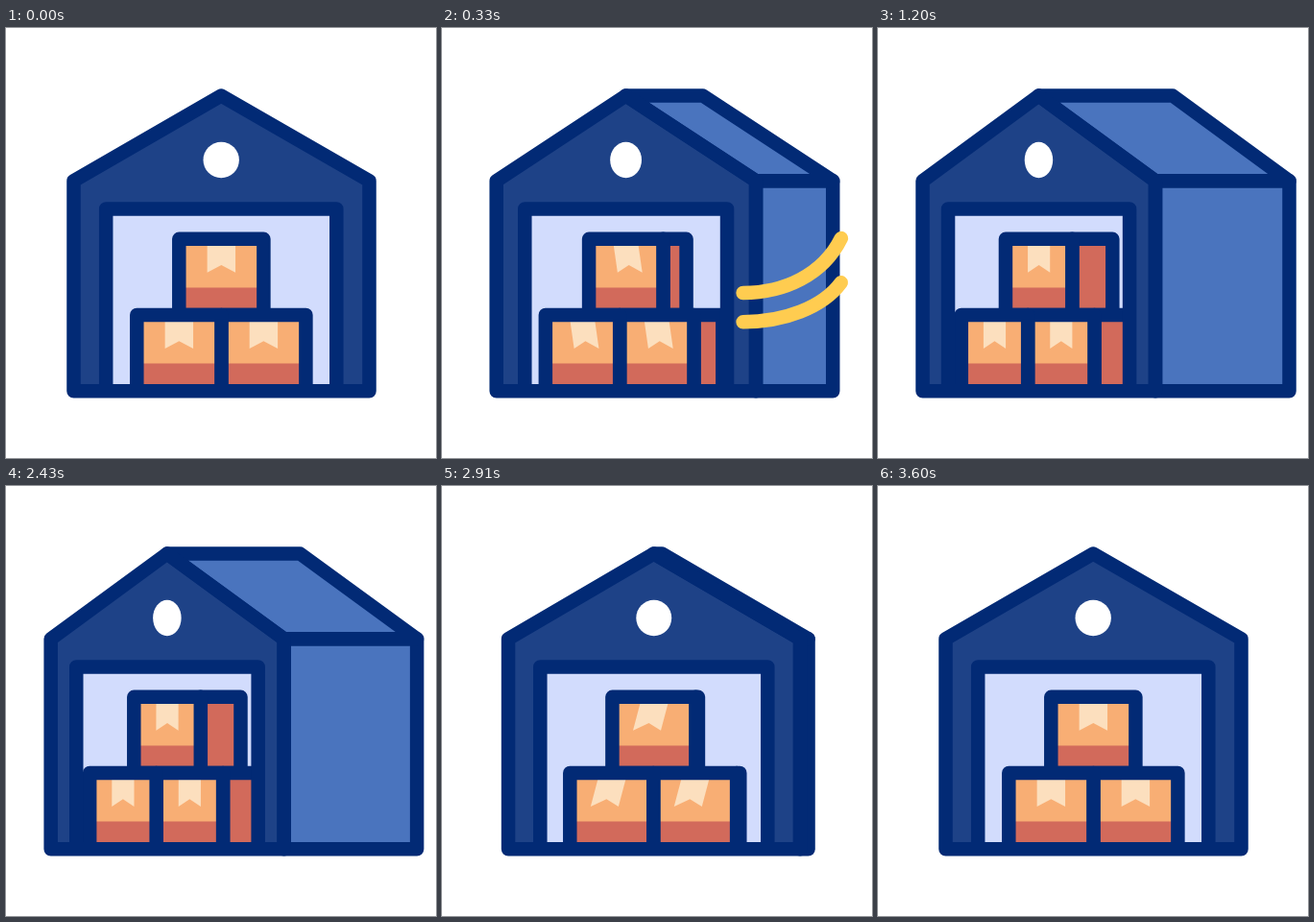
Write an HTML page with a canvas that moves like this. It is 448 by 448 pixels and loops after 4200 ms.

```html
<!DOCTYPE html>
<html lang="en">
<head>
<meta charset="utf-8">
<title>Warehouse</title>
<style>
  html, body { margin: 0; width: 100%; height: 100%; overflow: hidden; background: #fff; }
  canvas { display: block; width: 448px; height: 448px; }
</style>
</head>
<body>
<canvas id="stage" width="448" height="448"></canvas>
<script>
const ctx = document.getElementById('stage').getContext('2d');
const LOOP = 4200, STEP = 30;
const INK = '#022a75', FRONT = '#1e4287', SIDE = '#4a74be', INSIDE = '#d2dcfd';
const CARD = '#f8ae74', SHADE = '#d26a5b', TAPE = '#fcdfbe', STREAK = '#ffcc50';
const LINE = 14.5, APEX = 70.5, EAVE = 159.3, GROUND = 378.3, DOOR = 188.5;

// [time, value] tables: building turn and tape swing
const TURN = [[0, 0], [600, 1], [2400, 1], [3000, 0]];
const SWING = [[0, 0], [600, 8], [900, -8], [1200, 0], [2400, 0], [3000, -8], [3300, 8], [3600, 0]];

const mix = (a, b, k) => a + (b - a) * k;
const smooth = u => { u = Math.min(1, Math.max(0, u)); return u * u * (3 - 2 * u); };

function valueAt(table, t) {
  for (let i = 1; i < table.length; i++) {
    const [t0, a] = table[i - 1], [t1, b] = table[i];
    if (t <= t1) return mix(a, b, smooth((t - t0) / (t1 - t0)));
  }
  return table[table.length - 1][1];
}

function shape(points, fill, line) {
  ctx.beginPath();
  points.forEach(([x, y]) => ctx.lineTo(x, y));
  if (fill) {
    ctx.closePath();
    ctx.fillStyle = fill;
    ctx.fill();
  }
  if (line) {
    ctx.strokeStyle = line;
    ctx.lineWidth = LINE;
    ctx.stroke();
  }
}

const rect = (x0, y0, x1, y1, fill, line) =>
  shape([[x0, y0], [x1, y0], [x1, y1], [x0, y1]], fill, line);

function box(x0, x1, top, bottom, depth, swing, scale) {
  if (depth > 0) rect(x1, top, x1 + depth, bottom, SHADE, INK);
  const split = top + 50.6;
  rect(x0, top, x1, bottom, CARD);
  rect(x0, split, x1, bottom, SHADE);
  ctx.save();
  ctx.transform(scale, 0, swing * scale / 28, 1, (x0 + x1) / 2, top + 7);
  shape([[-14.7, 0], [14.7, 0], [14.7, 28], [0, 20.3], [-14.7, 28]], TAPE);
  ctx.restore();
  ctx.beginPath();
  ctx.rect(x0, top, x1 - x0, bottom - top);
  ctx.stroke();
}

// Drawn from the left tip; the streak enters from the right and leaves at the left
function streak(y, cy, endY, length, t) {
  const head = smooth(t / 300), tail = smooth((t - 300) / 300);
  if (head <= 0 || tail >= 1) return;
  ctx.save();
  ctx.beginPath();
  ctx.moveTo(313.6, y);
  ctx.bezierCurveTo(358, y, 400, cy, 418, endY);
  ctx.setLineDash([length * (head - tail), 2 * length]);
  ctx.lineDashOffset = -length * (1 - head);
  ctx.lineCap = 'round';
  ctx.lineWidth = LINE;
  ctx.strokeStyle = STREAK;
  ctx.stroke();
  ctx.restore();
}

function draw(t) {
  const turn = valueAt(TURN, t), swing = valueAt(SWING, t);
  const left = mix(70.5, 46.5, turn), right = mix(378.5, 289, turn);
  const depth = 139.5 * turn, scale = (right - left) / 308;
  const fx = x => left + (x - 70.5) * scale;
  const mid = fx(224.5) - 0.3, doorL = fx(104.2), doorR = fx(344.3);

  ctx.clearRect(0, 0, 448, 448);
  ctx.lineJoin = 'round';
  ctx.lineCap = 'butt';
  ctx.lineWidth = LINE;
  ctx.strokeStyle = INK;

  const gable = [[left, GROUND], [left, EAVE], [mid, APEX], [right, EAVE], [right, GROUND]];
  shape(gable, FRONT);
  ctx.beginPath();
  ctx.ellipse(mid, 137.5, 18.7 * scale, 18.7, 0, 0, 2 * Math.PI);
  ctx.fillStyle = '#fff';
  ctx.fill();

  rect(doorL, DOOR, doorR, GROUND, INSIDE);
  ctx.save();
  ctx.beginPath();
  ctx.rect(doorL, DOOR, doorR - doorL, GROUND - DOOR);
  ctx.clip();
  const shift = -11.5 * turn;
  box(fx(180.3), fx(268.4), 219.8, 299, 42 * turn, swing, scale);
  box(fx(224.4) + shift, fx(312.4) + shift, 299, GROUND, 52 * turn, swing, scale);
  box(fx(136.3) + shift, fx(224.4) + shift, 299, GROUND, 0, swing, scale);
  ctx.restore();
  shape([[doorL, GROUND], [doorL, DOOR], [doorR, DOOR], [doorR, GROUND]], null, INK);

  if (depth > 0) {
    rect(right, EAVE, right + depth, GROUND, SIDE, INK);
    shape([[mid, APEX], [mid + depth, APEX], [right + depth, EAVE], [right, EAVE]], SIDE);
    ctx.closePath();
    ctx.stroke();
  }
  ctx.beginPath();
  gable.forEach(([x, y]) => ctx.lineTo(x, y));
  ctx.closePath();
  ctx.stroke();

  streak(276, 256, 214.5, 127, t);
  streak(306.3, 290, 262, 117, t);
}

function frame() {
  const t = performance.now() % LOOP;
  draw(Math.floor(t / STEP) * STEP);
  requestAnimationFrame(frame);
}
frame();
</script>
</body>
</html>
```
